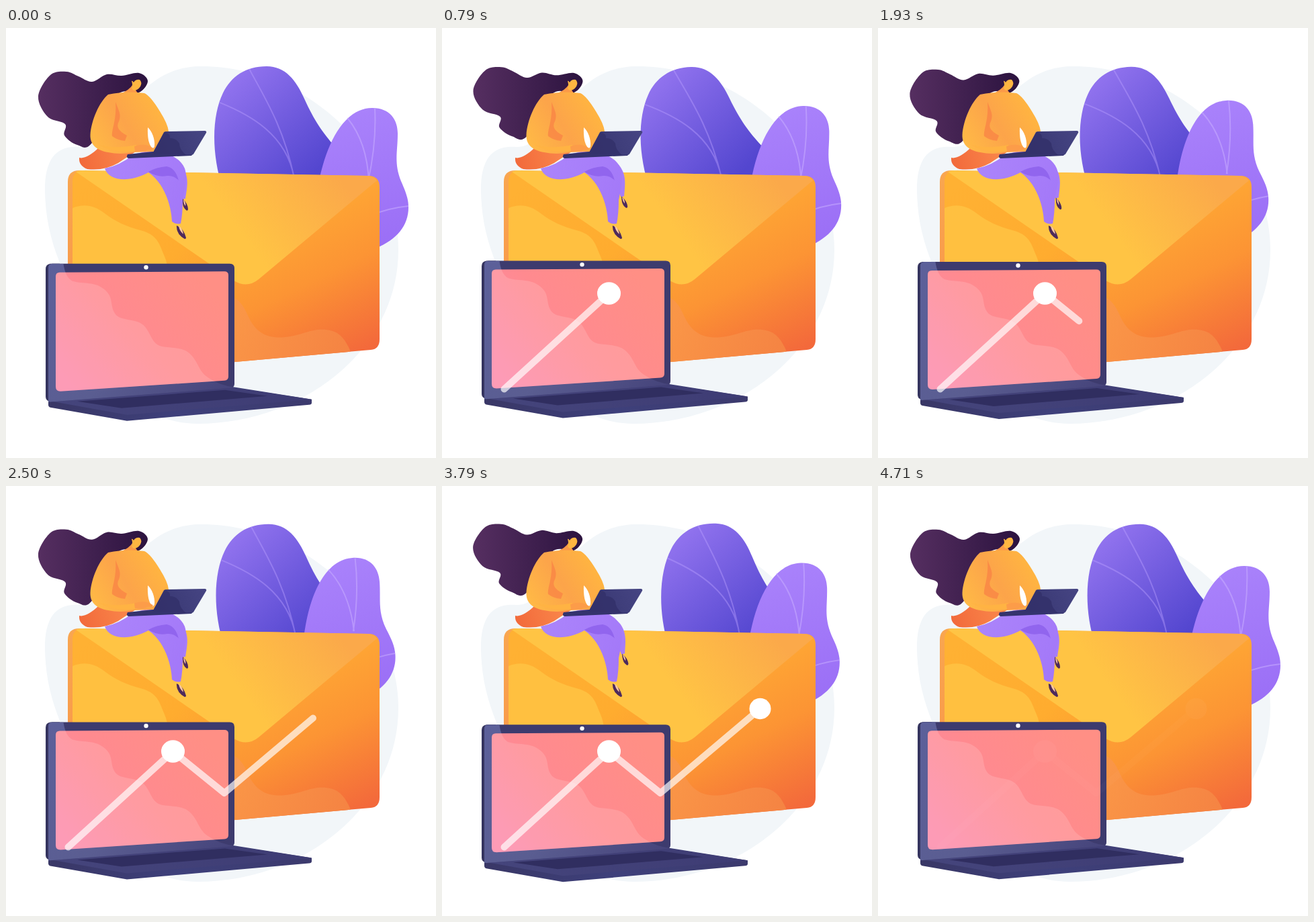
These frames come from a looping animation (640x640 px, 4780 ms). An HTML page:

```html
<!DOCTYPE html>
<html lang="en">
<head>
<meta charset="utf-8">
<title>Mail campaign</title>
<style>
html, body { margin: 0; width: 100%; height: 100%; overflow: hidden; background: #fff; }
svg { display: block; width: 100vw; height: 100vh; }
</style>
</head>
<body>
<svg viewBox="0 0 640 640" xmlns="http://www.w3.org/2000/svg">
  <defs id="defs">
    <clipPath id="mailClip"><use href="#mail"/></clipPath>
    <clipPath id="lidClip"><use href="#lid"/></clipPath>
    <clipPath id="screenClip"><use href="#screen"/></clipPath>
    <path id="shine" d="M50 340H84C86 356 88 370 99 376C117 381 131 376 146 388S154 411 162 424S196 430 207 444S217 472 237 474S269 476 279 490S288 512 303 521Q318 531 340 534V570H50Z"/>
  </defs>

  <path fill="#f2f6f9" d="M58 240C58 195 75 174 110 177C165 180 185 57 290 57C450 57 584 190 584 330C584 480 440 589 285 589C215 589 160 545 120 440C100 385 58 330 58 240Z"/>

  <g id="backLeaf">
    <path fill="url(#gBackLeaf)" d="M322 240C304 185 306 130 322 97C334 72 356 57 387 57C415 57 431 78 443 105C458 138 470 155 490 178Q512 205 512 240Z"/>
    <path fill="none" stroke="#b9a0ff" stroke-opacity=".42" stroke-width="2" d="M361 61C383 102 412 146 428 222M317 111C362 129 416 158 428 222"/>
  </g>
  <g id="frontLeaf">
    <path fill="url(#gFrontLeaf)" d="M462 250C472 180 500 119 545 119C572 119 583 137 583 157C583 185 577 200 588 228C595 244 599 254 599 267C599 294 582 315 550 328L470 330Z"/>
    <path fill="none" stroke="#c8adff" stroke-opacity=".55" stroke-width="2" d="M549 120C551 160 547 192 539 228M508 134C527 157 538 186 540 228M540 280Q568 268 599 265"/>
  </g>

  <!-- envelope -->
  <path fill="url(#gSide)" d="M92 229Q92 212 109 212H120V515H92Z"/>
  <path id="mail" fill="url(#gMail)" d="M99 230Q99 213 113 212L539 220Q556 220 556 237V463Q556 478 543 479L99 518.500Z"/>
  <g clip-path="url(#mailClip)">
    <path fill="url(#gMailLeft)" d="M99 214L104 213L345 377L340 520H99Z"/>
    <path fill="#ffc444" fill-opacity=".85" d="M99 268C116 261 132 264 147 276S181 296 200 301S226 315 231 328S239 344 241 360H99Z"/>
    <path fill="url(#gPeach)" d="M330 398C349 402 355 417 362 432C372 453 389 463 416 460S454 447 476 449S507 465 516 490L330 510Z"/>
  </g>
  <path fill="url(#gFlap)" d="M104 214Q108 212 113 212L539 220Q548 221 552 227L376 374Q359 388 339 376Z"/>

  <!-- woman -->
  <path id="hair" fill="url(#gHair)"/>
  <path fill="#fb9a48" d="M170 98Q184 92 188 85L196 97Z"/>
  <path fill="#ffb641" d="M187 79Q188 78 190 81Q193 76 199 77Q203 81 200 87Q196 93 190 93L187 90Q189 85 187 79Z"/>
  <path fill="url(#gHem)" d="M109 193C116 195 127 189 138 178L195 183Q177 194 167 201Q146 213 121 210Q108 205 109 193Z"/>
  <g id="backLeg">
    <path fill="#a67dfa" d="M228 199C249 193 263 202 268 218C272 231 268 245 267 254L262 255Q257 233 232 216Z"/>
    <path fill="#4d2a5c" d="M263 254Q271 262 271 270Q270 273 268 271Q262 267 263 254Z"/>
    <path fill="#ffc9a0" d="M264 255Q268 260 267 265Q264 261 264 255Z"/>
  </g>
  <path fill="url(#gLegs)" d="M147 209Q169 205 190 188L215 182C237 184 258 191 266 209C271 224 266 240 263 256Q263 277 260 291Q253 293 247 288C246 265 236 231 212 215C187 229 154 230 147 209Z"/>
  <path fill="#9165ee" d="M212 214Q224 207 239 206Q252 208 257 227Q250 219 240 220Q226 223 212 214Z"/>
  <path fill="#4d2a5c" d="M254 294Q264 298 268 312Q268 314 266 314Q253 307 254 294Z"/>
  <path fill="#ffc9a0" d="M257 294Q263 299 264 307Q258 302 257 294Z"/>
  <path fill="url(#gTop)" d="M152 99Q180 93 206 97Q215 101 229 124Q241 143 242 154L222 184L190 185Q170 189 152 185C135 182 125 174 125.500 159C127 137 139 110 152 99Z"/>
  <path fill="#f98145" fill-opacity=".7" d="M163 110C168 124 172 129 168 139C163 148 169 154 180 160L177 168Q166 167 158 161C157 150 165 137 163 110Z"/>
  <path fill="#fff" d="M211 148C217 153 222 165 221 176Q220 180 217 178Q210 170 211 148Z"/>
  <path fill="#ffb343" d="M137 173Q160 181 194 174L196 183Q160 188 137 173Z"/>
  <path id="hand" fill="#fc9c49" d="M191 176Q203 172 212 175L219 179Q217 182 211 181Q208 184 192 184Z"/>
  <path fill="#34336d" d="M181 188L219 184L280 185L276 190L183 194Q178 193 181 188Z"/>
  <path fill="url(#gMini)" d="M238 154L296 153Q299 153 298 156L280 186Q279 189 275 189L218 187L234 157Q235 154 238 154Z"/>
  <path fill="#32306a" fill-opacity=".8" d="M236 155Q245 157 244 164Q254 164 258 172Q258 181 268 189L218 187Z"/>

  <!-- big laptop -->
  <g id="laptop">
    <path fill="url(#gEdge)" d="M63 553L335 533L455 552V557Q455 560 451 560L180 584L66 564Q63 563 63 560Z"/>
    <path fill="url(#gDeck)" d="M63 554L335 534L455 552L180 575Z"/>
    <path fill="#302e60" d="M106 555L326 538L389 547L172 565Z"/>
    <path fill="#35345f" d="M66 350H80V554L64 555Q59 553 59 548V358Q59 351 66 350Z"/>
    <path id="lid" fill="#3d3b6e" d="M69 350H333Q340 350 340 357V529Q340 534.500 334 535L63 556V356Q63 350 69 350Z"/>
    <use href="#shine" fill="url(#gLid)" clip-path="url(#lidClip)"/>
    <path id="screen" fill="url(#gScreen)" d="M80 363L325 361.500Q331 361.500 331 367V518Q331 523.500 325 524L81 540Q74 540 74 533V369Q74 363 80 363Z"/>
    <use href="#shine" fill="#fff" fill-opacity=".14" clip-path="url(#screenClip)"/>
    <circle cx="208.500" cy="355.500" r="3.200" fill="#fff"/>
  </g>

  <!-- chart -->
  <g id="chart">
    <polyline id="line" fill="none" stroke="#fff" stroke-opacity=".68" stroke-width="10" stroke-linecap="round" stroke-linejoin="round"/>
    <ellipse id="dotA" rx="17.500" ry="16.700" fill="#fff"/>
    <ellipse id="dotB" rx="16" ry="15.700" fill="#fff"/>
  </g>
</svg>
<script>
const LOOP = 4780;
const $ = id => document.getElementById(id);
const pairs = s => s.trim().split(/\s+/).map(p => p.split(',').map(Number));
const clamp = x => Math.max(0, Math.min(1, x));
const span = (t, a, b) => clamp((t - a) / (b - a));
const smoothStep = x => x * x * (3 - 2 * x);
const easeOut = x => 1 - (1 - x) ** 3;
const wave = a => (1 - Math.cos(a)) / 2;

// Closed Catmull-Rom curve through the points
function curve(pts) {
  const n = pts.length, at = i => pts[(i + n) % n];
  let d = 'M' + pts[0];
  for (let i = 0; i < n; i++) {
    const [a, b, c, e] = [at(i - 1), at(i), at(i + 1), at(i + 2)];
    const h1 = b.map((v, k) => v + (c[k] - a[k]) / 6);
    const h2 = c.map((v, k) => v - (e[k] - b[k]) / 6);
    d += `C${h1} ${h2} ${c}`;
  }
  return d + 'Z';
}

function gradient(id, x1, y1, x2, y2, ...colors) {
  const ns = 'http://www.w3.org/2000/svg';
  const g = document.createElementNS(ns, 'linearGradient');
  const put = (el, o) => { for (const k in o) el.setAttribute(k, o[k]); };
  put(g, { id, x1, y1, x2, y2, gradientUnits: 'userSpaceOnUse' });
  colors.forEach((c, i) => {
    const s = document.createElementNS(ns, 'stop');
    put(s, { offset: i / (colors.length - 1), 'stop-color': c });
    g.appendChild(s);
  });
  $('defs').appendChild(g);
}

gradient('gBackLeaf', 335, 80, 460, 215, '#9072ee', '#5346cf');
gradient('gFrontLeaf', 520, 120, 570, 320, '#a982fb', '#9b6ff6');
gradient('gSide', 92, 212, 92, 510, '#f9a650', '#f89146');
gradient('gMail', 390, 270, 500, 495, '#ffab34', '#fc9434', '#f3693b');
gradient('gMailLeft', 110, 240, 330, 490, '#ffb133', '#ffac2f', '#fb9136');
gradient('gPeach', 350, 410, 500, 490, '#fa9647', '#f58443');
gradient('gFlap', 345, 300, 480, 200, '#ffc444', '#fba94a');
gradient('gHair', 50, 100, 205, 100, '#552e60', '#2d1440');
gradient('gHem', 112, 205, 180, 185, '#f26a3b', '#f9854a');
gradient('gLegs', 150, 210, 265, 270, '#ab84fb', '#a378f8');
gradient('gTop', 128, 165, 220, 110, '#ffb846', '#fca44a', '#ffb441');
gradient('gMini', 225, 185, 295, 155, '#383772', '#454482');
gradient('gEdge', 63, 570, 455, 555, '#393766', '#3e407b', '#3c3a6d');
gradient('gDeck', 63, 555, 455, 555, '#45457c', '#3e3c74');
gradient('gLid', 63, 355, 330, 550, '#5c609a', '#5a5d91', '#45437a');
gradient('gScreen', 290, 370, 100, 535, '#ff8f85', '#ff8a8f', '#fc8aaa');

const hair = pairs(`211,79 198,67 172,71 150,69 128,80 108,72 90,65 66,70
  48,102 62,132 88,143 87,160 106,174 128,171 165,100 198,96`);

// Hair swings up, more so away from the head and towards the tips
function swing([x, y], k) {
  const far = clamp((195 - x) / 75) ** 2;
  return [x - 2 * k, y - k * far * (9 + (y - 65) * 0.075)];
}

const knots = pairs('92.5,537.5 248.5,395 325,457 473.5,331.5');
const dist = (a, b) => Math.hypot(b[0] - a[0], b[1] - a[1]);
const len = knots.slice(1).map((p, i) => dist(knots[i], p));

function trace(rest) {
  const out = [knots[0]];
  for (let i = 0; i < len.length && rest > 0; i++) {
    const f = Math.min(1, rest / len[i]);
    out.push(knots[i].map((v, k) => v + (knots[i + 1][k] - v) * f));
    rest -= len[i];
  }
  return out.join(' ');
}

const move = (id, s) => $(id).setAttribute('transform', s);
const dot = (id, [x, y], k) => move(id, `translate(${x} ${y}) scale(${k})`);

function render(t) {
  const a = 2 * Math.PI * t / LOOP;
  const sway = 0.05 - Math.sin(a);
  const lean = wave(a);
  const lift = wave(2 * a);
  const press = smoothStep(span(t, 2100, 2450)) - smoothStep(span(t, 3250, 3650));

  move('laptop', `translate(0 ${0.5 + 4.8 * sway})`);
  move('backLeaf', `translate(${15 * sway} 0) rotate(${1.8 * sway} 428 218)`);
  move('frontLeaf', `translate(${-22.8 * lean} ${-12 * lean}) rotate(${-3.9 * lean} 540 219)`);
  move('backLeg', `translate(0 ${-3 * lift}) rotate(${-5.5 * lift} 248 196)`);
  move('hand', `translate(0 ${-1.5 * press})`);
  $('hair').setAttribute('d', curve(hair.map(p => swing(p, lift))));

  const drawn = len[0] * span(t, 60, 520) + (len[1] + len[2]) * span(t, 1750, 2561);
  $('line').setAttribute('points', trace(drawn));
  $('line').setAttribute('visibility', drawn > 0 ? 'visible' : 'hidden');
  dot('dotA', knots[1], easeOut(span(t, 450, 740)));
  dot('dotB', knots[3], easeOut(span(t, 2540, 2840)));
  $('chart').setAttribute('opacity', 1 - span(t, 4250, 4725));
}

function tick() {
  render(performance.now() % LOOP);
  requestAnimationFrame(tick);
}
render(0);
requestAnimationFrame(tick);
</script>
</body>
</html>
```
